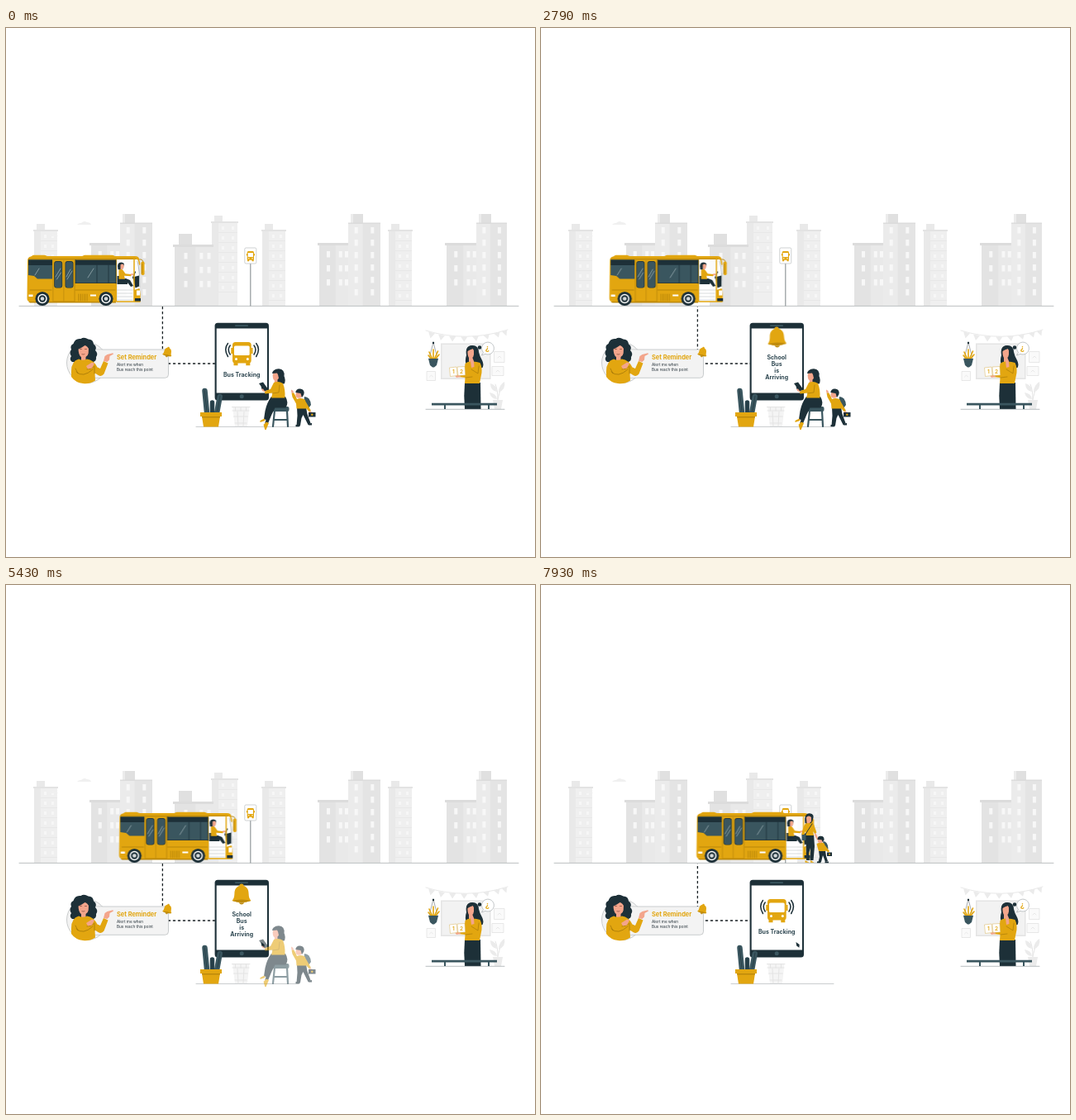
Write an HTML page that moves like this. It is 640x640 px and loops after 8000 ms.

```html
<!DOCTYPE html>
<html lang="en">
<head>
<meta charset="utf-8">
<title>School bus tracking</title>
<style>
  html, body { margin: 0; width: 100%; height: 100%; overflow: hidden; background: #fff; }
  svg { display: block; width: 100%; height: 100%; }
  text { font-family: Inter, "Open Sans", sans-serif; }
  .y { fill: #e2a610; }
  .yd { fill: #bd890b; }
  .d { fill: #1d3038; }
  .s { fill: #3a565f; }
  .k { fill: #f3a58b; }
  .w { fill: #fff; }
  .g { fill: #ebebeb; }
  .line { fill: none; stroke-linecap: round; stroke-linejoin: round; }
  .title { font-weight: 700; fill: #2d4650; font-size: 7px; text-anchor: middle; }

  .bus, .tracking, .alert, .bell, .home, .stop, .dashes { animation: 8s linear infinite; }
  .bus { animation-name: drive; }
  .dashes { animation-name: flow; stroke-dasharray: 3.2 2.8; }
  .tracking { animation-name: tracking; }
  .alert { animation-name: alert; }
  .home { animation-name: leave; }
  .stop { animation-name: arrive; }
  .bell { animation-name: swing; animation-timing-function: ease-in-out; transform-origin: 285px 361px; }

  @keyframes drive { to { transform: translateX(164px); } }
  @keyframes flow { to { stroke-dashoffset: -336px; } }
  @keyframes tracking {
    0%, 23.1% { opacity: 1; }
    29.1%, 76.2% { opacity: 0; }
    82.5%, 100% { opacity: 1; }
  }
  @keyframes alert {
    0%, 22.5% { opacity: 0; }
    27.7%, 76.2% { opacity: 1; }
    82.5%, 100% { opacity: 0; }
  }
  @keyframes leave {
    0%, 65.4% { opacity: 1; }
    71.2%, 100% { opacity: 0; }
  }
  @keyframes arrive {
    0%, 76.8% { opacity: 0; }
    83%, 100% { opacity: 1; }
  }
  @keyframes swing {
    0%, 22.5% { transform: rotate(0); }
    26.75% { transform: rotate(15deg); }
    32.4% { transform: rotate(-11deg); }
    38.1% { transform: rotate(12deg); }
    43.75% { transform: rotate(-10deg); }
    49% { transform: rotate(10deg); }
    53.5% { transform: rotate(-8deg); }
    57.5%, 100% { transform: rotate(0); }
  }
</style>
</head>
<body>
<svg viewBox="0 0 640 640">
  <defs>
    <g id="bellShape">
      <path class="y" d="M285 361.500c2 0 2.700 1.200 2.600 2.500c4.400 1.300 5.900 5 6 9.500c.1 4.300 1 6.300 2.800 8.500q-11.400 3.800-22.800 0c1.800-2.200 2.700-4.200 2.800-8.500c.1-4.500 1.600-8.200 6-9.500c-.1-1.300.6-2.500 2.600-2.500z"/>
      <path class="yd" d="M273.600 382q11.400-3 22.800 0q-11.400 4.200-22.800 0zM281.500 384.300h7q-3.500 4.600-7 0z"/>
    </g>
    <g id="wheel">
      <circle class="d" r="8.600"/><circle class="w" r="5.700"/><circle class="d" r="4.200"/><circle r="2.300" fill="#d5d9da"/>
    </g>
  </defs>

  <g id="city"></g>
  <path fill="#f0f0f0" d="M86 238q2-2.500 5-2q3-3.500 7-1q4 .2 5 3zM52 252q3-3 6-1.500q4-1 5 1.500z"/>
  <path class="line" stroke="#a0a6a8" stroke-width=".7" d="M16 336.400H620"/>

  <!-- stop sign -->
  <path class="line" stroke="#92999b" stroke-width="1.200" d="M295.800 285V336"/>
  <rect x="288.800" y="266" width="14" height="19" rx="1.500" fill="#fff" stroke="#b9bdbf" stroke-width=".7"/>
  <rect class="y" x="291.700" y="270" width="8.300" height="10.800" rx="1.500"/>
  <path class="y" d="M292 280h2.200v2.200h-2.200zM297.500 280h2.200v2.200h-2.200zM290.900 273h10v2.500h-10z"/>
  <path class="w" d="M292.700 272h6.300v5h-6.300zM292.900 278.300h1.500v1h-1.500zM297.300 278.300h1.500v1h-1.500z"/>

  <path class="dashes" fill="none" stroke="#1b2226" stroke-width="1.300" d="M189.400 337V389M253.200 406H196"/>

  <g class="bus">
    <path fill="#fff" opacity=".85" d="M133 280h27l2 36v15h-29z"/>
    <path class="line" stroke="#c9cdcf" stroke-width=".7" d="M134 317h20M134 321h19M134 325h19M134 329h19M134 312v19"/>
    <!-- driver -->
    <path class="d" d="M134.500 300h2.500v7h10v3h-12.500z"/>
    <path class="d" d="M137 303h8l5 2 4 7-3 1-4-5h-10z"/>
    <path class="d" d="M135.500 292q-2-8.500 4-8.500q4.500.5 3 4l-2 6z"/>
    <path class="k" d="M138.500 286.500q2-2 4 0v3.500l-1.500 1.200v2.500h-2.500zM150.500 297.500l3-.5 1 1.800-3.500 1z"/>
    <path class="y" d="M136.500 293q2-2 5 0l3 4.300 6.500.7v2.300l-8-.5 1 4h-7.500z"/>
    <path class="line" stroke="#1d3038" stroke-width="1.100" d="M153.500 302l3-7"/>
    <path class="d" d="M153 301.500l8-2v13l-4.500 2-1.500-7z"/>
    <!-- body -->
    <path class="y" d="M26 282q0-5 4-5.500l3-1.700h14l3 1.300h42l3-1.300h34l3 1.300h24q5 0 5.200 4H134v51H29q-3.500 0-3.500-4z"/>
    <path class="yd" d="M27 278.700h130v1H27zM27 331h106v1.400H29z"/>
    <path class="s" d="M27 280.500h29v23H38l-4-3.500-7-1z"/>
    <path class="d" d="M27 280.500h29v6.500H27zM83.700 280.500H133v6.500H83.700z"/>
    <path class="s" d="M83.700 286.800H133v21.700H83.700z"/>
    <path class="line" stroke="#1d3038" stroke-width=".8" d="M84 280.500v28M110 287v21M124 287v21M133 281v28M84 308.500h49"/>
    <path class="yd" d="M56.500 280.500h27v50.500h-27z"/>
    <path class="y" d="M57.300 281h12.200v49.500h-12.200zM70.300 281h12.300v49.500h-12.300z"/>
    <rect class="d" x="58.200" y="282" width="10" height="32.500" rx="3"/>
    <rect class="d" x="71.500" y="282" width="10" height="32.500" rx="3"/>
    <rect class="s" x="58.900" y="282.700" width="8.600" height="31.200" rx="2.500"/>
    <rect class="s" x="72.200" y="282.700" width="8.600" height="31.200" rx="2.500"/>
    <path class="line" stroke="#b9c8cc" stroke-width=".6" d="M60 301l6-10M61.500 304l5-8M74 304l6-10M73 301l5-9M99 302l7-11M35 299l5-8"/>
    <path class="line" stroke="#a87908" stroke-width=".7" d="M88 322v8M90.500 322v8M93 322v8M95.500 322v8M98 322v8M84 317h48M29 317h26"/>
    <path class="w" d="M27.500 322.500h5v2.500h-5zM102 322.500h7v2h-7z"/>
    <path class="line" stroke="#e2a610" stroke-width="1.500" d="M155 279.500V331M134 331h28M158 279q3 0 3.600 7"/>
    <path class="y" d="M155 317l6.500-2q1.600 6 1 16H155z"/>
    <path class="d" d="M156 327h7v3.500h-7z"/>
    <path class="w" d="M158 317.500h4v6h-4z"/>
    <path class="line" stroke="#8b999e" stroke-width=".6" d="M159 282q3 12 2.800 31"/>
    <path class="line" stroke="#b78408" stroke-width=".9" d="M161 280q5-1 5 4"/>
    <rect class="y" x="163.500" y="282.500" width="4" height="16.500" rx="1.800"/>
    <path class="yd" d="M164 285h1v12h-1z"/>
    <use href="#wheel" x="44" y="327.500"/>
    <use href="#wheel" x="121" y="327.500"/>
  </g>

  <!-- parent and child at the stop -->
  <g class="stop">
    <path class="d" d="M320.500 302h9.500l1 14-1.500 17h-4l.5-15-2 7 1 8h-4z"/>
    <path class="d" d="M319.500 288q-1.500-12 5.500-11.800q7 .3 3.500 9l-4 6z"/>
    <path class="k" d="M321 281q3-3 6 0v5l-2 2v3h-3.500v-3zM315.500 302l2-.8 1 3.500-2 1.500zM331.500 299l2 3 2 6-1.500.5-3-6z"/>
    <path class="y" d="M320 288.500q6-1.500 10 1l3.500 10-2.500 1.500-2-4 1 6h-9.500l-.5-5-2.200 5-2.600-1q2-10 4.800-13.500zM319.500 333l5 2.700h-5zM326 333l4.500 2.700H326z"/>
    <path class="line" stroke="#1d3038" stroke-width=".9" d="M328 289L319 303"/>
    <rect class="s" x="315.500" y="302" width="5" height="7" rx="1"/>
    <path class="d" d="M336 321h8l1 7 2 6-3 1-3-8-2 8h-3.500l1.500-6z"/>
    <path class="s" d="M341 310q6 0 6.500 9l-4 3z"/>
    <path class="y" d="M336 312q5-1.500 7 1l1.500 9H336l-1-3-1.500-6zM343 314l6 8-1.500 1.500-6-5z"/>
    <circle class="k" cx="338" cy="309" r="3.200"/>
    <path class="d" d="M334.500 308q0-4.500 4-4.300q4.500 0 4 5l-2 2-1-2.500zM346 323.500h6v4.500h-6zM334 334.500h4.500v1.700H334zM343.500 334.500h4.500v1.700h-4.500z"/>
    <circle class="y" cx="349" cy="325.700" r="1"/>
  </g>

  <!-- reminder card -->
  <circle cx="98" cy="405" r="24.500" fill="#f3f3f3" stroke="#b5b9ba" stroke-width=".7"/>
  <rect x="100" y="389" width="96.500" height="34.300" rx="4" fill="#f3f3f3" stroke="#b5b9ba" stroke-width=".7"/>
  <path fill="#f3f3f3" d="M96 389.700h20v33h-20z"/>
  <path class="d" d="M80 404q-4-3-1-7q-3-4 0-8q-2-5 2.500-7q2-7 9-6q4-2.500 9 .5q6 0 6.500 6q4.500 3 2 7.500q4 4 1 8q1 5-4.500 6.500z"/>
  <path class="k" d="M87.500 387q1-4 6-4q6 0 6.500 4.500l-.3 6q-.7 3.500-3.200 4.500v6h-5.500v-6q-3.500-2-3.500-11z"/>
  <path class="d" d="M86.500 389q-.5-8 7-8q7.500 0 7.500 9q-2-5-5.500-6q-4 3-9 5z"/>
  <path class="line" stroke="#6d392e" stroke-width=".6" d="M89.500 388.500h2M95.500 388.500h2M92 394.700q2 .8 3 0"/>
  <path class="y" d="M79 415q0-12 9-14.500q5 2.500 10 0q8 1 12.500 10l3.500 1.500 4-9 5.500 2.500-5 13q-3 4-7 1.500l-4-2.500.5 9q-8 5-15 3.500q-9-1-14-8z"/>
  <path class="line" stroke="#9c7108" stroke-width=".7" d="M85 416q8 8 20-3M107 409v9M84 412l3 6M98 413q5 0 8-3"/>
  <path class="k" d="M118 403l1.500-6 3-2 6.800-1.700.7 1.300-4.500 2.500-.5 4.500-2.500 2.500zM97 409l7-4.500 3 1-3 6-5 1z"/>
  <text x="134" y="401.400" font-size="7.400" font-weight="700" fill="#e2a610">Set Reminder</text>
  <text x="134" y="409.400" font-size="4.700" fill="#26323a">Alert me when</text>
  <text x="134" y="415.300" font-size="4.700" fill="#26323a">Bus reach this point</text>
  <use href="#bellShape" transform="translate(195.600 392) rotate(12) scale(.5) translate(-285 -374)"/>

  <!-- tablet -->
  <rect class="d" x="252.600" y="356.800" width="65.400" height="93.800" rx="3.500"/>
  <path class="w" d="M254.700 363.500h61.300v78h-61.300z"/>
  <rect class="s" x="277" y="359.300" width="16" height="1.700" rx=".8"/>
  <circle class="s" cx="285.200" cy="445.800" r="2.500"/>
  <path class="d" d="M308.500 432l4.200 3-.3 3.700-3.200-2.200z"/>
  <g class="tracking">
    <rect class="y" x="274" y="380" width="22.700" height="25.500" rx="3.500"/>
    <path class="y" d="M272.300 387h2v7h-2zM296.500 387h2v7h-2z"/>
    <rect class="w" x="276" y="384.600" width="18.700" height="11.400" rx="1.500"/>
    <circle class="w" cx="278.500" cy="400.500" r="1.500"/><circle class="w" cx="292.300" cy="400.500" r="1.500"/>
    <path class="y" d="M275.500 405h5v3.300h-5zM290.300 405h5v3.300h-5z"/>
    <path class="line" stroke="#1d3038" stroke-width="1.500" d="M271.200 384q-4 5 0 11M268.500 381.500q-5.500 7 0 16M300 384q4 5 0 11M302.700 381.500q5.500 7 0 16"/>
    <text class="title" x="285.200" y="422.400">Bus Tracking</text>
  </g>
  <g class="alert">
    <use class="bell" href="#bellShape"/>
    <text class="title" x="285.200" y="401.300">School</text>
    <text class="title" x="285.200" y="409.300">Bus</text>
    <text class="title" x="285.200" y="417.300">is</text>
    <text class="title" x="285.200" y="425.300">Arriving</text>
  </g>

  <!-- cactus and basket -->
  <path class="line" stroke="#b3b8ba" stroke-width=".7" d="M230 482.500H354"/>
  <path class="line" stroke="#3a565f" stroke-width="6.500" d="M240.500 439l2.500 26M258.700 446l-3.500 19"/>
  <path class="line" stroke="#2a444e" stroke-width="5.500" d="M249.500 453v13"/>
  <path class="line" stroke="#1d3038" stroke-width=".6" d="M240 438l3 25M259 445l-3 18M249.500 452v11"/>
  <path class="y" d="M235 465h26v5h-26zM237 470h22l-2 12.500h-18z"/>
  <path class="yd" d="M237 470h22l-.3 1.500h-21.400z"/>
  <path fill="#f4f4f4" d="M274 458h20.500l-2.500 24h-15z"/>
  <path class="line" stroke="#e2e2e2" stroke-width=".9" d="M273.500 458.500h21.500M274 463h20M275.500 470h17M277 478h14M277.500 459v4M284 459v4M290.500 459v4M280 464l1 18M288 464l-1 18"/>

  <!-- parent and child at home -->
  <g class="home">
    <path class="line" stroke="#3a565f" stroke-width="2.200" d="M325 463l-2 19M340 463l1 19M325 474h15"/>
    <rect class="s" x="322" y="458" width="20.500" height="6" rx="2"/>
    <path class="d" d="M321 446h17q4.500 7 .5 13.500h-13l-4 8-5 12-3.200-1.500 4-13-2.300 9-3-.7 1.500-10q2-10 7.500-17.300z"/>
    <path class="y" d="M311.500 480l3.500-3.500 3 1.500-3.500 8.300-1.200-.3zM307.500 475l5-2.500 1 2.500-6 2z"/>
    <path class="d" d="M324 421q-2-8.500 6-8.700q7.500.5 6.500 9q2 4 .5 9l-7 1z"/>
    <path class="k" d="M322.700 419q2-4 6.500-2.500l1 7-1.700 2v4h-3.700v-3.500q-2.300-.5-2.100-7z"/>
    <path class="d" d="M322 418q1-5.500 7-4.500l4 9-3 1.500q0-4-2-6.500z"/>
    <path class="y" d="M324 429q6-2.500 11 1q3 7 2.500 17.500H321l1.500-6-9 1-1-3.500 7.500-2z"/>
    <path class="line" stroke="#a97b09" stroke-width=".7" d="M331 432l-1 9-8 1"/>
    <path class="k" d="M309 437l4-1.500 1.500 4.500-4-.5z"/>
    <path class="d" d="M306 430l5-1.500 6.500 9-4.500 1.700z"/>
    <path class="d" d="M352 459h11l1.500 8 4 11-3 2-6-12-2 4-1.500 9h-4.500l1-12z"/>
    <path class="s" d="M361 446q7 0 8 10l-3 4-6-4z"/>
    <path class="y" d="M352 449q6-2.500 10 1l1.500 10.500h-12l-.5-6-4.500-8-1-5 2.500-.5 2.500 4.500zM362 451l7 12-2 1.500-8-9z"/>
    <path class="k" d="M345 437.500l2.500 1.500.3 3-2.500-1zM367 463l3 1.500-.5 2-2.500-1.500z"/>
    <circle class="k" cx="354.500" cy="443.700" r="4"/>
    <path class="d" d="M350.300 441q.7-5 5.700-4.500q6 1 4.300 7l-2.300 3.500-1.500-5zM366 465h8.500v5.500H366zM350.500 480h5v2.300h-5zM365.500 478.500l4.500-.5v2.500h-4z"/>
    <circle class="y" cx="370.300" cy="467.700" r="1.200"/>
  </g>

  <!-- classroom -->
  <path class="line" stroke="#dadada" stroke-width=".6" d="M508 366Q557 381 607 365"/>
  <path class="g" d="M511 367l8 2.500-5.500 6zM523 370.500l8 1.500-5 6zM536 372.500l8.500.5-4.500 6.500zM550 373.300h8.500l-4.200 6.500zM564 373l8-1-3 7zM577 371.500l8-1.700-2 7zM590 369.500l7.500-2-1.500 7zM600 367.500l6-2-.5 7z"/>
  <rect x="526" y="381.500" width="60.500" height="43.500" fill="#e4e4e4"/>
  <rect x="527.500" y="383" width="57.500" height="40.500" fill="#f2f2f2"/>
  <g fill="#fafafa" stroke="#e4e4e4" stroke-width=".8">
    <path d="M590.500 391.500h12.500v13h-12.500zM588 409.500h14v11h-14zM509 415.500h10.500v11H509z"/>
    <path class="line" d="M595 399l2-2 2 2M593 416l2-2 2 2M512.500 422l2-2 2 2"/>
  </g>
  <path class="line" stroke="#4c555a" stroke-width=".5" d="M517 380l-5 20M517 380l5 20"/>
  <circle class="d" cx="517" cy="381" r="1.200"/>
  <path class="line" stroke="#e2a610" stroke-width="1.600" d="M517 401v-12M516 401l-4-9M518 401l4.500-10M515 401l-4-5M519 401l5-6"/>
  <path class="s" d="M511 400h12l-2 8-3 2.500h-2l-3-2.500z"/>
  <path class="line" stroke="#e4e4e4" stroke-width="1" d="M595 450q0-13-3-19M595 449l4-15"/>
  <path class="g" d="M594 440q-8-1-8-10q8 2 8 10zM596 441q0-9 7-13q2 9-7 13zM594 449q-7 0-9-8q8 1 9 8zM589 450h12l-2 11h-8z"/>
  <circle class="d" cx="573" cy="386.500" r="2.300"/>
  <path class="d" d="M557 396q-2-12 7.500-12q7 0 7.500 8q1 5 4 10q2.500 5 .5 9q-6 2-10-1l-9-1q-3-6-.5-13z"/>
  <path class="d" d="M555 429h19l.5 32h-19.500q-1.500-16 0-32z"/>
  <path class="k" d="M558.500 389q4-4 7.500 0v6q-.5 3.500-2 4v5h-4v-5q-2-3-1.500-10z"/>
  <path class="d" d="M557 392q0-7.500 7-8q5.500.5 6.500 14l-3.500 2q1-6-2-12q-4 1-8 4z"/>
  <path class="y" d="M555.500 406q3-3 7-2.500q6-.5 11 1.500q2.500 5 2 12l-2.500 13H555l.5-7-9-1 .5-3.500 7 .5z"/>
  <path class="line" stroke="#a97b09" stroke-width=".7" d="M572 409l-1 9-8-5M556 423l8-1"/>
  <path class="k" d="M561.500 399l2.500-1 2 5 .5 7-3.500 1zM543 420.500l6-1.500 1 3-5 1z"/>
  <g fill="#fff" stroke="#d8b45c" stroke-width=".5">
    <path d="M536.500 411l8.500-1 1 10.500-8.500 1zM546 410l9-.5.7 10.500-8.700.5z"/>
  </g>
  <g class="y" font-size="6.500" font-weight="600" text-anchor="middle">
    <text x="541.300" y="418.200">1</text><text x="551" y="417.700">2</text>
  </g>
  <path fill="#fff" stroke="#a7adaf" stroke-width=".7" d="M577.500 392.500l-2 3.500 4.500-1.700a7.400 7.400 0 1 0-2.500-1.800z"/>
  <text class="y" x="582.300" y="389.500" font-size="9" font-weight="700" text-anchor="middle">¿</text>
  <path class="line" stroke="#9ba2a5" stroke-width=".7" d="M508 461.300H603"/>
  <path class="s" d="M515 453.700h79v2.800h-79zM530 456.500h2v4.500h-2zM583 456.500h2v4.500h-2z"/>
</svg>
<script>
  const GROUND = 336;
  const rect = (x, y, w, h, fill) => `<rect x="${x}" y="${y}" width="${w}" height="${h}" fill="${fill}"/>`;

  function windows(xs, top, bottom, step) {
    let out = '';
    for (let y = top; y < bottom; y += step) out += xs.map(x => rect(x, y, 4, 7.5, '#f7f7f7')).join('');
    return out;
  }

  // A slim pale tower with floor lines.
  function slim(x, y, w) {
    let out = rect(x + 3, y - 8, 10, 8, '#e9e9e9') + rect(x, y, w, GROUND - y, '#efefef') +
      rect(x, y, 8, GROUND - y, '#e9e9e9') + rect(x - 1, y - 1, w + 2, 2, '#e3e3e3');
    for (let fy = y + 12; fy < GROUND - 5; fy += 12) {
      out += rect(x + 8, fy, w - 8, .7, '#e5e5e5') + rect(x + 12, fy - 7, 3, 4, '#f6f6f6') + rect(x + w - 7, fy - 7, 3, 4, '#f6f6f6');
    }
    return out;
  }

  function low(x, y, w) {
    return rect(x, y, w, GROUND - y, '#e9e9e9') + rect(x, y, w * .55, GROUND - y, '#e3e3e3') +
      rect(x - 2, y - 2, w + 3, 3, '#dcdcdc') +
      windows([x + w * .25, x + w * .66, x + w * .86], y + 8, GROUND - 15, 17);
  }

  function tall(x, w) {
    return rect(x + 5, 225, 13, 11, '#e0e0e0') + rect(x + 3, 225, 3, 11, '#ececec') +
      rect(x, 236, w, 100, '#e4e4e4') + rect(x, 236, w * .45, 100, '#ebebeb') + rect(x, 235.500, w, 1.500, '#dcdcdc') +
      windows([x + w * .2, x + w * .7], 241, GROUND - 15, 15);
  }

  document.getElementById('city').innerHTML =
    slim(34, 245, 28) + low(103, 262, 35) + tall(138, 39) +
    rect(209, 249, 16, 14, '#e0e0e0') + slim(249, 235, 31) + low(204, 264, 46) +
    slim(310, 245, 28) + low(379, 262, 36) + tall(414, 39) +
    slim(463, 245, 28) + low(533, 262, 37) + tall(569, 37);
</script>
</body>
</html>
```
